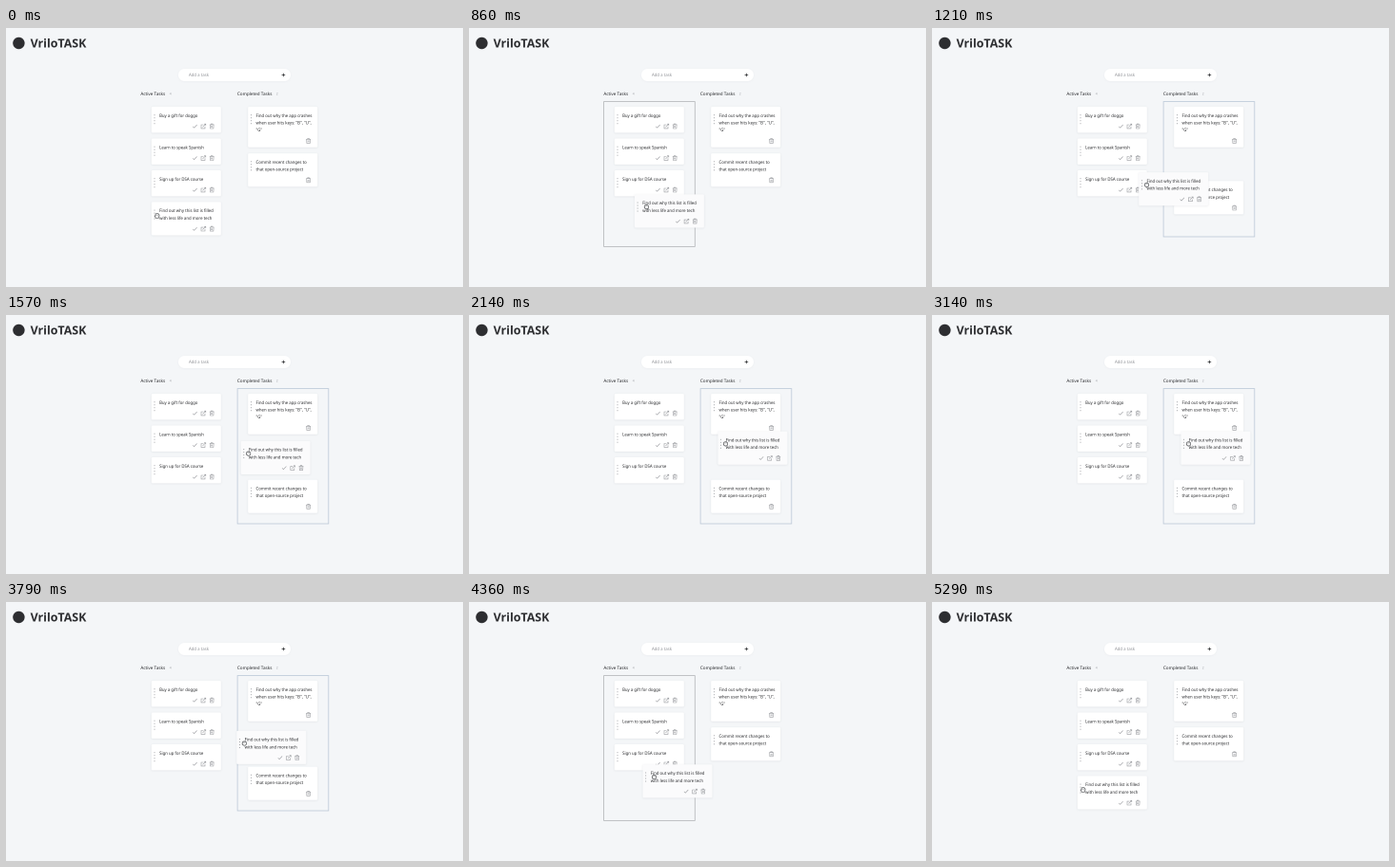
Animation, 480 px wide and 273 px high, one loop 5360 ms. Source, as an HTML page with a canvas:

```html
<!DOCTYPE html>
<html lang="en">
<head>
<meta charset="utf-8">
<title>Task board</title>
<style>
html, body { margin: 0; width: 100%; height: 100%; overflow: hidden; background: #f4f6f8; }
canvas { display: block; width: 480px; height: 273px; }
</style>
</head>
<body>
<canvas id="stage"></canvas>
<script>
const W = 480, H = 273, LOOP = 5360, STEPS = 75;
const GRAB = 2, LIFT = 9, CROSS = 16, REST = 31, SETTLE = 32;
const DARK = '#27282b', ICON = '#9a9ca0';

const canvas = document.getElementById('stage');
const ctx = canvas.getContext('2d');
const scale = 2 * (window.devicePixelRatio || 1); // oversampled so small type keeps its shape
canvas.width = W * scale;
canvas.height = H * scale;

const clamp01 = v => Math.min(1, Math.max(0, v));
const glide = (n, span, power) => 1 - Math.exp(-Math.pow(n / span, power));

// Card offset: a quick swing to the right column, a pause, then a small settling drift.
function offset(k) {
  const n = Math.max(0, Math.min(k, REST) - LIFT + 1);
  const settle = clamp01((k - SETTLE) / 4);
  return {
    x: 110.3 * glide(n, 9.7, 1.75) - 4.5 * settle,
    y: -61.7 * glide(n, 10.7, 2) + 5.5 * settle
  };
}

function text(str, x, y, size, color = DARK, weight = 400) {
  ctx.save();
  ctx.translate(x, y);
  ctx.scale(size / 100, size / 100);
  ctx.font = weight + ' 100px "Noto Sans", "Open Sans", sans-serif';
  ctx.fillStyle = color;
  ctx.fillText(str, 0, 0);
  ctx.restore();
}

function box(x, y, w, h, r, fill, blur, alpha) {
  ctx.save();
  ctx.shadowColor = `rgba(40,50,70,${alpha})`;
  ctx.shadowBlur = blur * scale;
  ctx.shadowOffsetY = 0.5 * scale;
  ctx.beginPath();
  ctx.roundRect(x, y, w, h, r);
  ctx.fillStyle = fill;
  ctx.fill();
  ctx.restore();
}

function line(x, y, path, color = ICON, width = 0.6) {
  ctx.save();
  ctx.translate(x, y);
  ctx.strokeStyle = color;
  ctx.lineWidth = width;
  ctx.stroke(new Path2D(path));
  ctx.restore();
}

const CHECK = 'M-2.2 .1L-.8 1.5L2.2-1.7';
const EDIT = 'M0-1.5H-2.4V2.4H1.6V.3M-.9.9L2.2-2.2M.7-2.3H2.4V-.6';
const TRASH = 'M-2.4-1.6H2.4M-.8-1.7V-2.5H.8V-1.7M-1.9-1.6L-1.7 2.5H1.7L1.9-1.6M-.5-.4V1.4M.5-.4V1.4';
const PLUS = 'M-1.8 0H1.8M0-1.8V1.8';
const FIST = 'M-1.9-1Q-1.4-2.2-.4-1.8Q.6-2.4 1.2-1.5Q2.3-1.5 2.2 0Q2.2 2.2.5 2.3H-.6Q-2.3 1.4-2.2.2Z';
const PALM = 'M-1.6 2.3L-2.5.2L-1.7-.3L-1.8-1.9Q0-3.2 1.6-1.9L2.3-.6L1.5 2.3Z';
const KNUCKLES = 'M-.6-1.4V-.2M.5-1.4V-.2';

function card(x, y, lines, active, lifted) {
  const h = 19.7 + lines.length * 7.7;
  const iconY = y + h - 6.9;
  box(x, y, 73, h, 1.2, lifted ? '#fbfbfc' : '#fff', 2, 0.09);
  ctx.fillStyle = '#909296';
  for (let i = 0; i < 4; i++) ctx.fillRect(x + 2.8, y + 8.2 + i * 3, 0.8, 1);
  lines.forEach((s, i) => text(s, x + 8.3, y + 10.8 + i * 7.7, 4.3));
  if (active) {
    line(x + 45.6, iconY + 0.2, CHECK);
    line(x + 54.6, iconY, EDIT);
  }
  line(x + 63.4, iconY, TRASH);
}

function hand(x, y, closed) {
  const shape = closed ? FIST : PALM;
  ctx.save();
  ctx.translate(x, y);
  ctx.fillStyle = '#f4f4f4';
  ctx.fill(new Path2D(shape));
  ctx.restore();
  line(x, y, shape, '#55575a', 0.7);
  line(x, y, KNUCKLES, '#77797c', 0.4);
}

function zone(x, h, color) {
  ctx.strokeStyle = color;
  ctx.lineWidth = 0.8;
  ctx.strokeRect(x, 77.6, 95.7, h);
}

function heading(str, x, count, countX) {
  text(str, x, 71, 4.6, DARK, 500);
  text(count, countX, 70.6, 3.3, '#a0a3a8');
}

function header() {
  ctx.beginPath();
  ctx.arc(13.4, 16, 6.2, 0, Math.PI * 2);
  ctx.fillStyle = '#2d2e31';
  ctx.fill();
  text('VriloTASK', 25.6, 20.4, 12.4, '#2d2e31', 700);

  box(181, 43, 118, 13, 6.5, '#fff', 2, 0.04);
  text('Add a task', 192, 51, 4.3, '#909297');
  line(291.4, 49.5, PLUS, DARK, 0.7);

  heading('Active Tasks', 141.4, '4', 171.7);
  heading('Completed Tasks', 242.9, '2', 283.7);
}

function draw(k) {
  const { x, y } = offset(k);
  const lifted = k >= LIFT;
  ctx.setTransform(scale, 0, 0, scale, 0, 0);
  ctx.fillStyle = '#f4f6f8';
  ctx.fillRect(0, 0, W, H);
  header();

  if (k >= CROSS) zone(243.1, 142.4, '#bcc8d8');
  else if (lifted) zone(141.6, 152.8, '#b4b6b9');

  ['Buy a gift for doggo', 'Learn to speak Spanish', 'Sign up for DSA course']
    .forEach((s, i) => card(152.8, 83 + i * 33.5, [s], true));

  const push = 41.5 * (1 - Math.pow(1 - clamp01((k - CROSS) / 3), 3));
  card(254.2, 83, ['Find out why the app crashes', 'when user hits keys: "B", "U",', '"G"']);
  card(254.2, 132.1 + push, ['Commit recent changes to', 'that open-source project']);
  card(152.8 + x, 183.4 + y, ['Find out why this list is filled', 'with less life and more tech'], true, lifted);

  // The pointer runs ahead of the card while the drag picks up speed.
  const lead = lifted ? 2 + 4.5 * Math.exp(-Math.pow((k - 12) / 3, 2)) : 0;
  hand(158.8 + x + lead, 198 + y - (lifted ? 1.5 : 0), k >= GRAB);
}

// The drag plays forward, then the same steps run backward.
const start = performance.now();
function tick(now) {
  const t = Math.max(0, now - start) % LOOP;
  const i = Math.min(STEPS - 1, Math.floor(t / LOOP * STEPS + 0.1));
  draw(Math.min(i, STEPS - 1 - i));
  requestAnimationFrame(tick);
}
tick(start);
</script>
</body>
</html>
```
